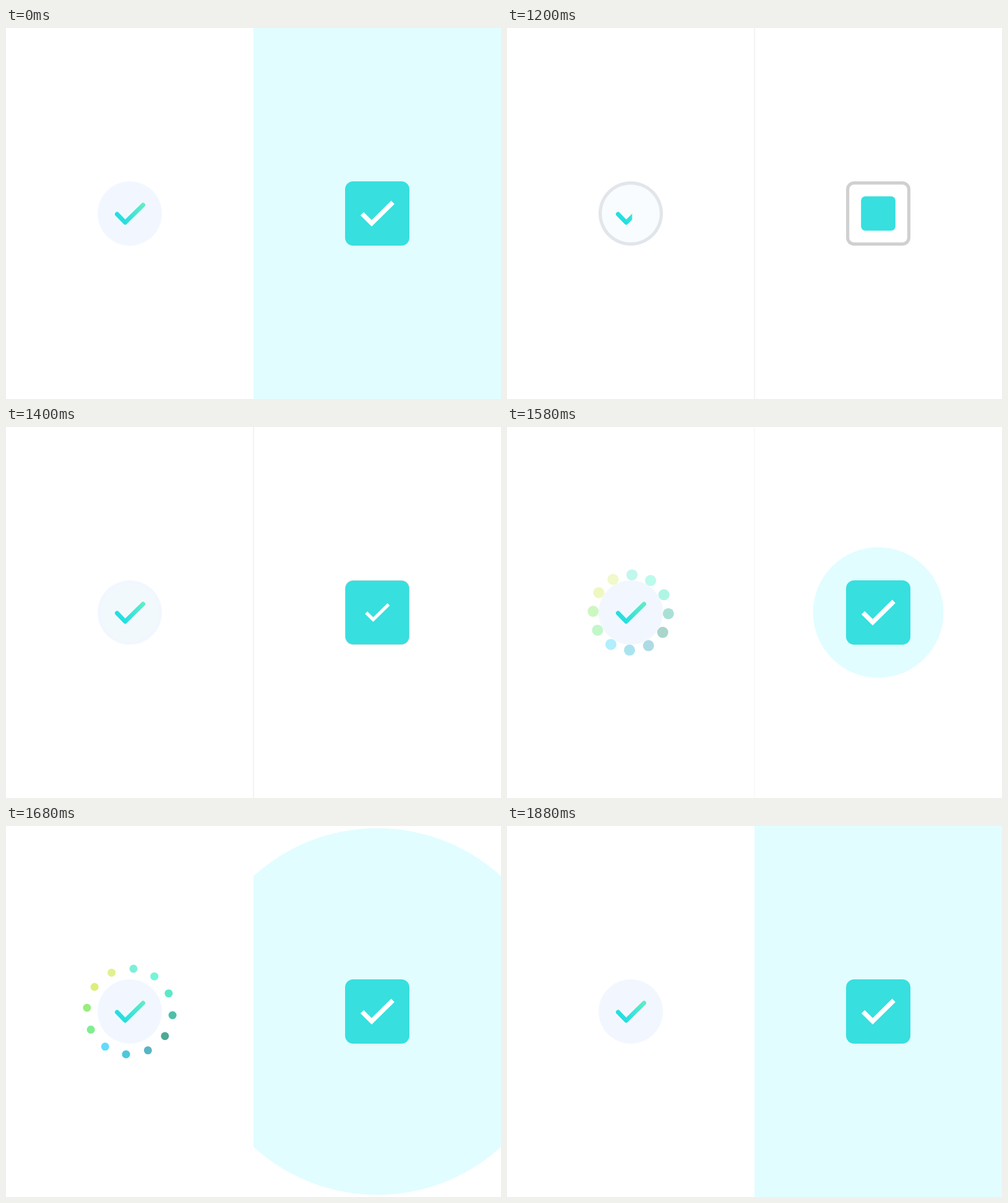
These frames come from a looping animation (800 by 600 pixels, 2.18 s). An HTML page with a canvas:

```html
<!DOCTYPE html>
<html lang="en">
<head>
<meta charset="utf-8">
<title>Checkbox animations</title>
<style>
  html, body { margin: 0; width: 100%; height: 100%; overflow: hidden; background: #fff; }
  canvas { display: block; width: 800px; height: 600px; }
</style>
</head>
<body>
<canvas id="stage" width="800" height="600"></canvas>
<script>
const ctx = document.getElementById('stage').getContext('2d');
const LOOP = 2180, STEP = 20, TAU = Math.PI * 2;
const RESET = 1000, DONE = 1880;
const WHITE = [255, 255, 255], GRAY = [208, 208, 208];
const PALE = [242, 247, 255], ICE = [241, 249, 253];
const CYAN = '#37dfdf', MINT = '#e1fdff';
const DOTS = ['#47e7c7', '#38f1c7', '#13e0b0', '#01a484', '#008366', '#0f95ab',
              '#00b0cd', '#1fccf8', '#47e760', '#6ce744', '#cde844', '#d6ea60'];

const clamp = v => Math.max(0, Math.min(1, v));
const span = (t, start, length) => clamp((t - start) / length);

function bezier(x1, y1, x2, y2) {
  const at = (a, b, s) => 3 * a * s * (1 - s) ** 2 + 3 * b * s * s * (1 - s) + s ** 3;
  return x => {
    let lo = 0, hi = 1;
    for (let i = 0; i < 30; i++) {
      const mid = (lo + hi) / 2;
      if (at(x1, x2, mid) < x) lo = mid; else hi = mid;
    }
    return at(y1, y2, hi);
  };
}
const ease = bezier(0.25, 0.1, 0.25, 1);
const easeInOut = bezier(0.42, 0, 0.58, 1);

function mix(a, b, p) {
  return a.map((v, i) => v + (b[i] - v) * p);
}
const rgb = c => `rgb(${c.map(Math.round).join(',')})`;

function disc(x, y, r, fill) {
  ctx.beginPath();
  ctx.arc(x, y, r, 0, TAU);
  ctx.fillStyle = fill;
  ctx.fill();
}

function box(size, radius, fill) {
  ctx.beginPath();
  ctx.roundRect(600 - size / 2, 300 - size / 2, size, size, radius);
  ctx.fillStyle = fill;
  ctx.fill();
}

function tick(points, width, style, cap, join) {
  ctx.beginPath();
  points.forEach(([x, y]) => ctx.lineTo(x, y));
  ctx.lineWidth = width;
  ctx.strokeStyle = style;
  ctx.lineCap = cap;
  ctx.lineJoin = join;
  ctx.stroke();
}

function burst(t) {
  if (t <= 1520 || t >= DONE) return;
  const d = t - 1620;
  const reach = 64.4 + 0.0873 * d - 6.7e-5 * d * d;
  const size = 8 - 0.025 * d;
  const turn = (3.1 + 0.031 * d) * Math.PI / 180;
  ctx.globalAlpha = span(t, 1520, 260) ** 0.74;
  DOTS.forEach((color, i) => {
    const a = turn + i * TAU / 12;
    disc(200 + reach * Math.sin(a), 300 - reach * Math.cos(a), size, color);
  });
  ctx.globalAlpha = 1;
}

function roundCheck(t, p) {
  burst(t);
  const settle = span(t, 1400, 60);
  disc(200, 300, 52, rgb(mix(GRAY, PALE, p)));
  if (settle < 1) disc(200, 300, 46.8, rgb(mix(mix(WHITE, ICE, p), PALE, settle)));
  if (p <= 0) return;
  const shade = ctx.createLinearGradient(180, 318, 221, 283);
  shade.addColorStop(0, '#16dbe6');
  shade.addColorStop(1, '#62ecc6');
  ctx.save();
  ctx.beginPath();
  ctx.rect(175, 270, 51 * p, 60);
  ctx.clip();
  tick([[179.5, 301], [192.7, 314.6], [221.5, 286.2]], 7, shade, 'round', 'round');
  ctx.restore();
}

function squareCheck(t, p) {
  const wave = ease(span(t, 1508, 387));
  ctx.save();
  ctx.beginPath();
  ctx.rect(400, 0, 400, 600);
  ctx.clip();
  if (t >= DONE) {
    ctx.fillStyle = MINT;
    ctx.fillRect(400, 0, 400, 600);
  } else if (wave > 0) {
    disc(600, 300, 400 * wave, MINT);
  }
  if (p < 1) {
    box(104, 13, rgb(GRAY));
    box(93.6, 7.8, '#fff');
  }
  if (p > 0) box(104 * p, 13 * p, CYAN);
  const grow = easeInOut(span(t, 1170, 360));
  if (grow > 0) {
    ctx.translate(600, 300);
    ctx.scale(grow, grow);
    tick([[-24.5, 0.3], [-9, 15.7], [25.2, -18]], 7.4, '#fff', 'butt', 'miter');
  }
  ctx.restore();
}

function draw(t) {
  ctx.fillStyle = '#fff';
  ctx.fillRect(0, 0, 800, 600);
  const line = 1 - span(t, 1510, 150);
  if (line > 0) {
    ctx.globalAlpha = line;
    ctx.fillStyle = '#f3f3f3';
    ctx.fillRect(399, 0, 2, 600);
    ctx.globalAlpha = 1;
  }
  const p = ease(span(t, 1088, 360));
  roundCheck(t, p);
  squareCheck(t, p);
}

function frame() {
  const t = Math.floor((performance.now() % LOOP) / STEP) * STEP;
  draw(t < RESET ? DONE : t);
  requestAnimationFrame(frame);
}
frame();
</script>
</body>
</html>
```
